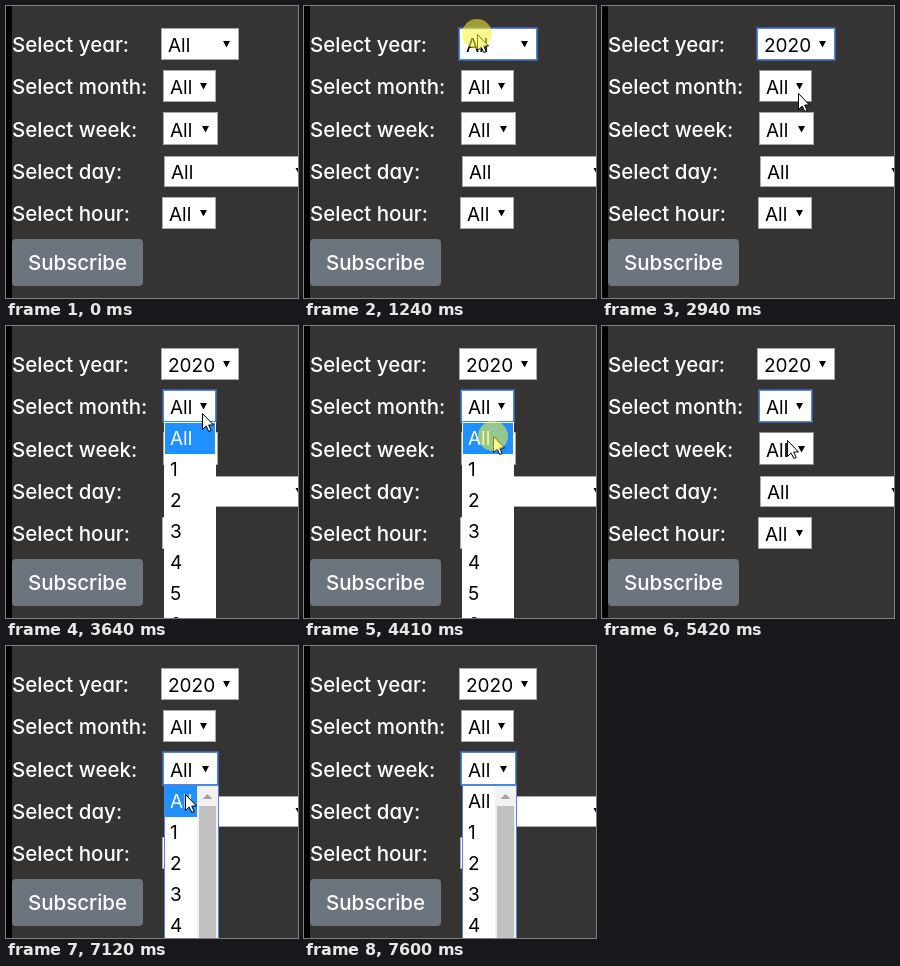
Write an HTML page that moves like this. It is 292 by 292 pixels and loops after 8 s.

```html
<!DOCTYPE html>
<html lang="en">
<head>
<meta charset="utf-8">
<title>Select filters</title>
<style>
  html, body { margin: 0; width: 100%; height: 100%; overflow: hidden; background: #353432; }
  svg { display: block; width: 100vw; height: 100vh; }
  text { font: 19px Inter, "Open Sans", sans-serif; font-feature-settings: "cv11"; white-space: pre; }
  .label { font-size: 20.5px; font-weight: 500; fill: #fff; }
  rect { shape-rendering: crispEdges; }
  .button { fill: #6c757d; shape-rendering: auto; }
</style>
</head>
<body>
<svg id="stage" viewBox="0 0 292 292"></svg>
<script>
const LOOP = 8000, ROW = 31;
const BACKGROUND = "#353432", BLUE = "#4f86dc", GLOW = "#3d5f9b", HIGHLIGHT = "#1e90ff";

const numbers = count => ["All", ...Array.from({ length: count }, (_, i) => i + 1)];

// focus, blur, open and close are times in ms
const selects = [
  { name: "year", x: 155, y: 22, w: 78, h: 32, textX: 162, arrowX: 220.5,
    focus: 1240, blur: 3490, open: 1330, close: 2480,
    listX: 156, listY: 53, listW: 77, edge: BLUE,
    options: ["All", 2020, 2019, 2018, 2017, 2016, 2015], picked: 2020 },
  { name: "month", x: 157, y: 64, w: 53, h: 32, textX: 164, arrowX: 197.5,
    focus: 3490, blur: 6110, open: 3490, close: 4560,
    listX: 158, listY: 96, listW: 52, edge: "#fff", options: numbers(12) },
  { name: "week", x: 157, y: 106, w: 55, h: 33, textX: 164, arrowX: 199.5,
    focus: 6110, blur: LOOP, open: 6190, close: LOOP,
    listX: 158, listY: 139, listW: 55, edge: BLUE, options: numbers(53), scrollbar: true },
  { name: "day", x: 158, y: 150, w: 146, h: 31, textX: 165, arrowX: 293 },
  { name: "hour", x: 156, y: 191, w: 54, h: 32, textX: 163, arrowX: 197.5 },
];

// The pointer is sampled in discrete steps: [first, last, steps, x, y]
const start = [300, 235];
const moves = [
  [310, 840, 8, 173, 28],
  [1620, 1940, 5, 190, 82],
  [2020, 2100, 2, 196, 110],
  [2790, 2940, 3, 196, 87],
  [4100, 4410, 5, 189, 110],
  [4810, 4960, 3, 186, 113],
  [5420, 5420, 1, 185, 114],
  [5650, 5960, 5, 179, 122],
  [7050, 7430, 6, 179, 275],
  [7600, 7600, 1, 179, 310],
];
const clicks = [[1240, 1330], [2400, 2480], [3490, 3640], [4410, 4560], [6110, 6190]];

const within = (t, from, to) => t >= from && t < to;

function pointerAt(t) {
  let [x, y] = start;
  for (const [first, last, steps, toX, toY] of moves) {
    if (t < first) break;
    const interval = (last - first) / (steps - 1) || 1;
    const done = Math.min(1, (Math.floor((t - first + 4) / interval) + 1) / steps);
    x += (toX - x) * done;
    y += (toY - y) * done;
  }
  return { x: Math.round(x), y: Math.round(y) };
}

const rect = (x, y, w, h, fill, extra = "") =>
  `<rect x="${x}" y="${y}" width="${w}" height="${h}" fill="${fill}" ${extra}/>`;
const frame = (x, y, w, h, stroke, fill = "none") =>
  rect(x + .5, y + .5, w - 1, h - 1, fill, `stroke="${stroke}"`);
const text = (x, y, value, extra = "") => `<text x="${x}" y="${y}" ${extra}>${value}</text>`;
const label = (x, y, value) => text(x, y, value, 'class="label"');

function drawSelect(s, t, hovered) {
  const focused = within(t, s.focus, s.blur);
  const value = s.picked && t >= s.close ? s.picked : "All";
  const border = focused ? BLUE : hovered ? "#8a8a8a" : "#a9a9a9";
  const baseline = s.y + s.h - 8;
  return label(6, baseline, `Select ${s.name}:`)
    + (focused ? frame(s.x - 1, s.y - 1, s.w + 2, s.h + 2, GLOW) : "")
    + frame(s.x, s.y, s.w, s.h, border, "#fff")
    + text(s.textX, baseline, value)
    + `<path d="M${s.arrowX - 3.5} ${baseline - 11}h7l-3.5 6.500z"/>`;
}

function drawList(s, pointer) {
  const rowWidth = s.scrollbar ? 32 : s.listW - 2;
  const active = Math.max(0, Math.floor((pointer.y - s.listY) / ROW));
  let out = frame(s.listX, s.listY, s.listW, s.options.length * ROW + 3, s.edge, "#fff");
  s.options.slice(0, 7).forEach((option, i) => {
    const y = s.listY + i * ROW, on = i === active;
    if (on) out += rect(s.listX + 1, y + 1, rowWidth, ROW, HIGHLIGHT);
    out += text(s.textX, y + 23, option, on ? 'fill="#fff"' : "");
  });
  if (s.scrollbar) {
    out += rect(191, s.listY + 1, 21, 400, "#f1f1f1")
      + rect(193, s.listY + 21, 17, 300, "#c1c1c1")
      + `<path d="M196.500 ${s.listY + 14}h10l-5 -5z" fill="#a3a3a3"/>`;
  }
  return out;
}

function drawPointer({ x, y }, pressed) {
  return `<path transform="translate(${x} ${y})" fill="#fff" stroke="#000"
      d="M.5 .5V16.500L4.200 13L6.800 18.500L9.200 17.500L6.700 12H11.500Z"/>`
    + (pressed ? `<circle cx="${x}" cy="${y}" r="15" fill="#f8f432" opacity=".55"/>` : "");
}

const stage = document.getElementById("stage");

function draw(t) {
  const pointer = pointerAt(t);
  const opened = selects.find(s => within(t, s.open, s.close));
  const isHovered = s => !opened
    && within(pointer.x, s.x, s.x + s.w) && within(pointer.y, s.y, s.y + s.h);
  stage.innerHTML = rect(0, 0, 292, 292, BACKGROUND)
    + rect(0, 0, 6, 292, "#000")
    + selects.map(s => drawSelect(s, t, isHovered(s))).join("")
    + rect(6, 233, 131, 47, "#6c757d", 'rx="4" class="button"')
    + label(22, 264, "Subscribe")
    + (opened ? drawList(opened, pointer) : "")
    + drawPointer(pointer, clicks.some(([from, to]) => within(t, from, to)));
}

const begin = performance.now();
function tick() {
  draw((performance.now() - begin) % LOOP);
  requestAnimationFrame(tick);
}
tick();
</script>
</body>
</html>
```
